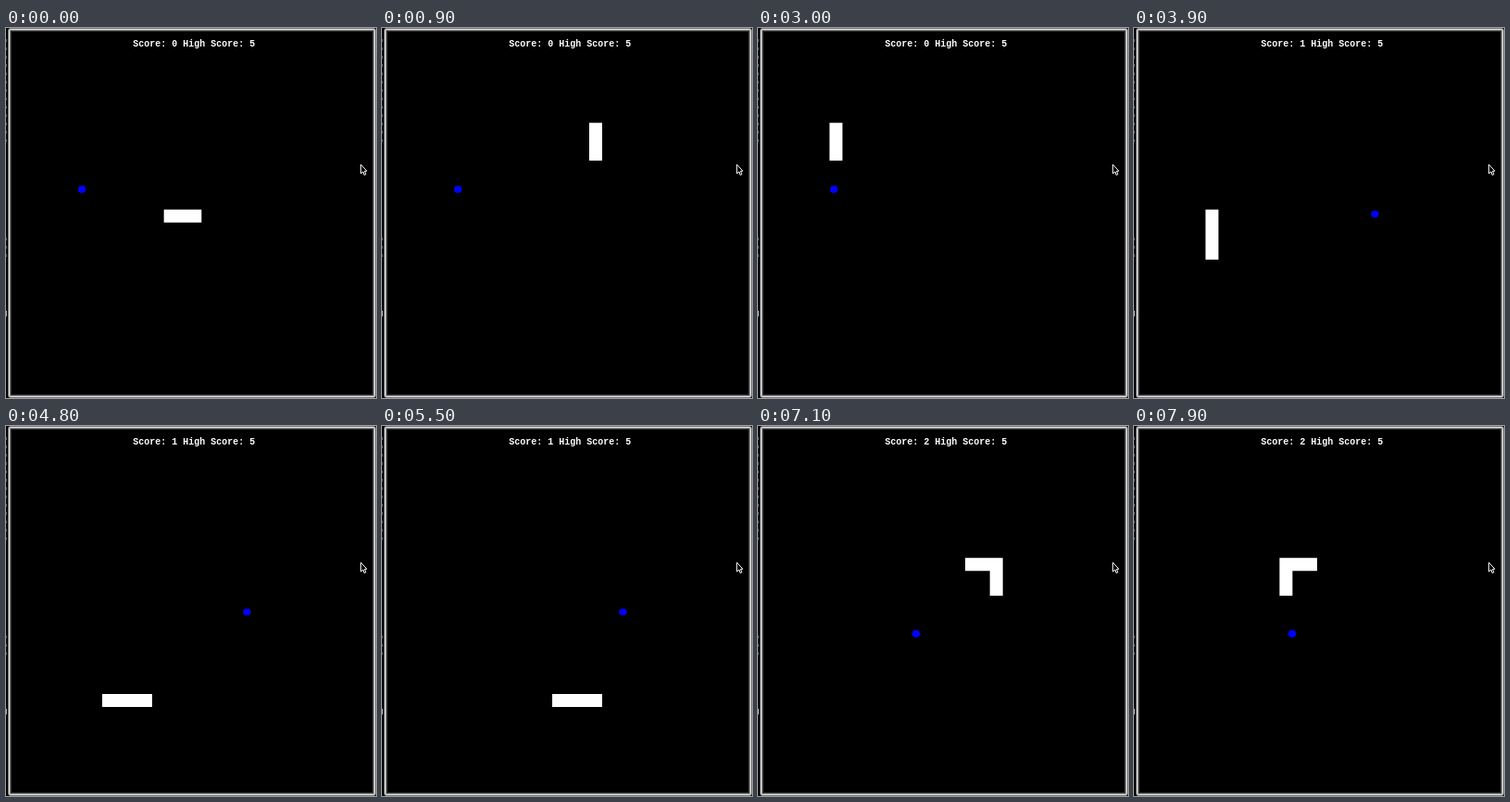
Recreate the animation shown at these times as an HTML page with a canvas. Size 400 by 399 pixels, loop 8000 ms.

```html
<!DOCTYPE html>
<html lang="en">
<head>
<meta charset="utf-8">
<title>Snake</title>
<style>
  html, body { margin: 0; width: 100%; height: 100%; overflow: hidden; background: #000; }
  canvas { display: block; }
</style>
</head>
<body>
<canvas id="stage" width="400" height="399"></canvas>
<script>
const ctx = document.getElementById('stage').getContext('2d');

const LOOP = 8000, TICK = 100;
const STEP = 40 / 3, CELL = 14, ORIGIN = { x: 77.35, y: 62.3 };

// Corners of the snake's route, as [column, row].
const corners = [[7, 10], [11, 10], [11, 0], [0, 0], [0, 17], [13, 17], [13, 6], [6, 6], [6, 8]];
const pauses = [12, 25, 38, 51, 65, 78];   // ticks without a move
const meals = [33, 62];                    // route positions where food is eaten
const foods = [[82.1, 173.9], [260.5, 200.6], [170.9, 224]];

const route = [corners[0]];
for (let i = 1; i < corners.length; i++) {
  const [tx, ty] = corners[i];
  let [x, y] = corners[i - 1];
  while (x !== tx || y !== ty) {
    x += Math.sign(tx - x);
    y += Math.sign(ty - y);
    route.push([x, y]);
  }
}

function rect(color, x, y, w, h) {
  ctx.fillStyle = color;
  ctx.fillRect(x, y, w, h);
}

function drawWindow() {
  rect('#000', 0, 0, 400, 399);
  for (let y = 12; y <= 120; y += 9) rect('#555', 0, y, 1, 3);
  for (let y = 226; y <= 244; y += 9) rect('#555', 0, y, 1, 3);
  rect('#aaa', 0, 305, 1, 6);

  // Nested frames, from the outer rim to the playing field.
  ['#777', '#e4e4e4', '#808080', '#303030', '#000'].forEach((color, inset) => {
    ctx.fillStyle = color;
    ctx.beginPath();
    ctx.roundRect(2 + inset, inset, 398 - 2 * inset, 399 - 2 * inset, Math.max(0, 3 - inset));
    ctx.fill();
  });
}

function drawCursor() {
  ctx.beginPath();
  [[383.7, 147.2], [383.7, 157], [385.9, 155], [387.2, 158.5], [389, 157.8],
   [387.5, 154.6], [390, 154.2]].forEach(p => ctx.lineTo(...p));
  ctx.closePath();
  ctx.fillStyle = '#000';
  ctx.fill();
  ctx.strokeStyle = '#fff';
  ctx.lineWidth = 1;
  ctx.stroke();
}

function drawScore(score) {
  ctx.fillStyle = '#fff';
  ctx.font = 'bold 10px "Liberation Mono", monospace';
  ctx.fillText(`Score: ${score} High Score: 5`, 137.3, 20);
}

function drawFood([x, y]) {
  ctx.fillStyle = '#00f';
  ctx.beginPath();
  ctx.ellipse(x, y, 4.2, 3.9, 0, 0, Math.PI * 2);
  ctx.fill();
}

function drawSnake(head, length) {
  ctx.fillStyle = '#fff';
  ctx.beginPath();
  for (const [col, row] of route.slice(head - length + 1, head + 1)) {
    ctx.rect(ORIGIN.x + col * STEP, ORIGIN.y + row * STEP, CELL, CELL);
  }
  ctx.fill();
}

function draw(time) {
  const tick = Math.floor((time % LOOP) / TICK);
  const head = 2 + tick - pauses.filter(p => p <= tick).length;
  const score = meals.filter(m => m <= head).length;
  // The tail grows one move after the food is eaten.
  const length = 3 + meals.filter(m => m < head).length;

  drawWindow();
  drawScore(score);
  drawFood(foods[score]);
  drawSnake(head, length);
  drawCursor();
}

const start = performance.now();
function loop() {
  draw(performance.now() - start);
  requestAnimationFrame(loop);
}
loop();
</script>
</body>
</html>
```
